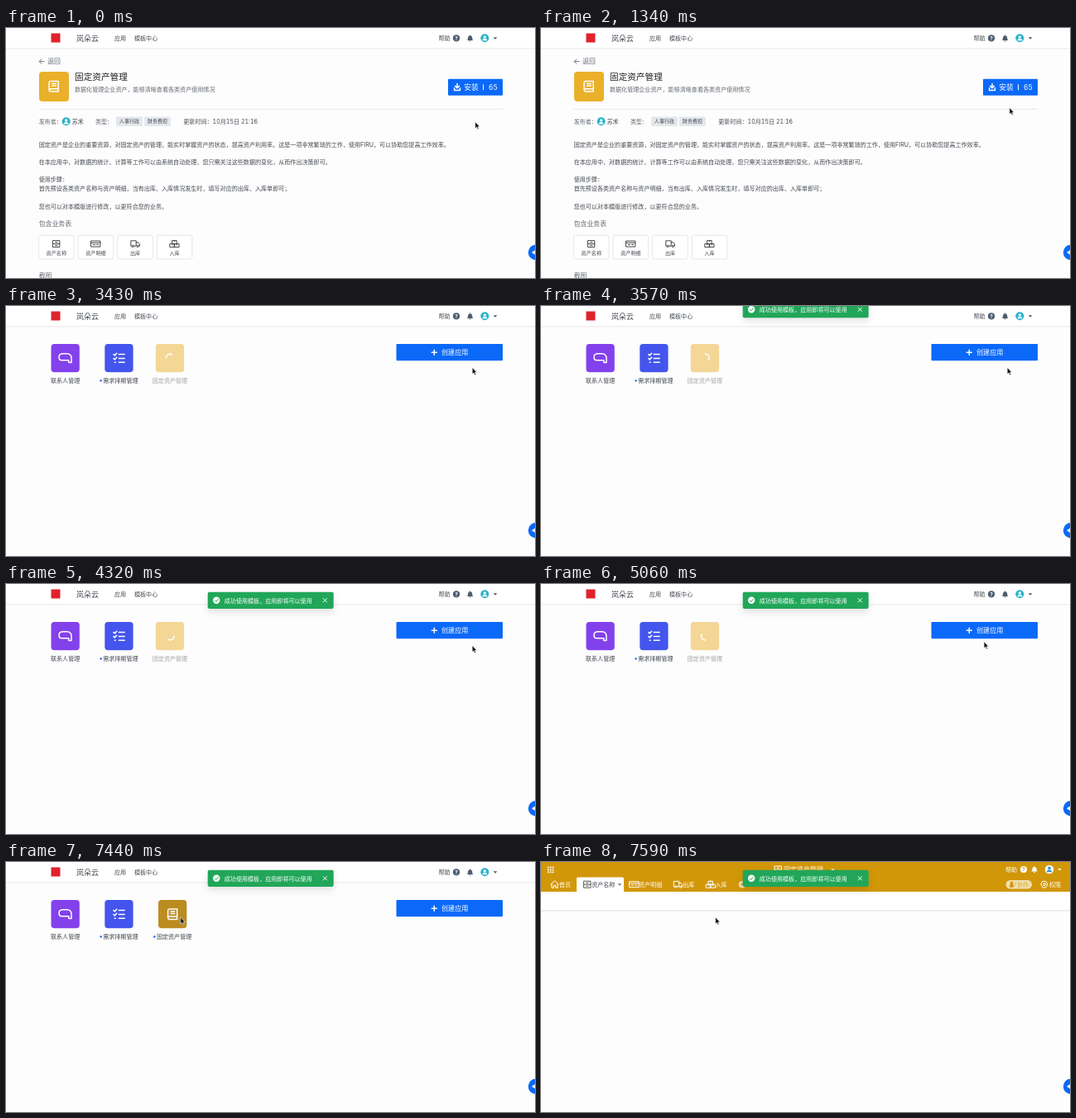
An HTML page for the animation above (8 s loop, 639 by 303 pixels).

```html
<!DOCTYPE html>
<html lang="zh-CN">
<head>
<meta charset="utf-8">
<title>应用安装演示</title>
<style>
html, body { margin: 0; width: 100%; height: 100%; overflow: hidden; background: #fdfdfd; }
svg { display: block; width: 100%; height: 100%; }
text { font: 400 7.07px Inter, "Noto Sans CJK SC", "Noto Sans CJK", sans-serif; font-variant-numeric: tabular-nums; fill: #434850; white-space: pre; }
.small { font-size: 6.1px; }
.mid { font-size: 7.9px; fill: #636a73; }
.soft { fill: #646a72; }
.white { fill: #fff; }
.big { font-size: 8.8px; fill: #fff; }
.mark { font-size: 6.4px; font-weight: 700; text-anchor: middle; }
.line { fill: none; stroke: currentColor; stroke-width: 1; stroke-linecap: round; stroke-linejoin: round; }
.thick { stroke-width: 1.5; }
.rule { stroke: #e2e2e2; stroke-width: .8; }
.card { fill: #fff; stroke: #e0e2e5; stroke-width: .8; }
#toast { filter: drop-shadow(0 4px 4px rgba(0,0,0,.11)); }
</style>
</head>
<body>
<svg viewBox="0 0 639 303">
  <defs>
    <g id="book" class="line thick">
      <path d="M-3.8-6.2H5.5V6.2H-3.8A1.8 1.8 0 0 1-5.6 4.4V-4.4A1.8 1.8 0 0 1-3.8-6.2ZM-5.4 4.2A1.8 1.8 0 0 1-3.8 2.9H5.5M-2.2-3.3H2.6M-2.2-.7H2.6"/>
    </g>
    <g id="cabinet" class="line"><path d="M-4-4H4V4H-4ZM-4 0H4M-1.2-2H1.2M-1.2 2H1.2"/></g>
    <g id="sheet" class="line"><path d="M-5.5-3.5H5.5V3.5H-5.5ZM-5.5-1.3H5.5M-3.3 1H-.8M1.2 1H3.2"/></g>
    <g id="truck" class="line">
      <path d="M-3.9 2.6H-5.2V-3.8H1.2V2.6H-1.4M1.2-1.8H3.6L5.4.4V2.6H4.6"/>
      <circle cx="-2.7" cy="2.9" r="1.2"/><circle cx="3.2" cy="2.9" r="1.2"/>
    </g>
    <g id="boxes" class="line"><path d="M-5.4 0H0V4H-5.4ZM0 0H5.4V4H0ZM-2.6-4H2.6V0H-2.6ZM0-4V-2.6M-2.7 0V1.4M2.7 0V1.4"/></g>
    <g id="bell">
      <path fill="currentColor" d="M-3.6 2.4C-2.5 1.4-2.7.2-2.6-.9A2.6 2.6 0 0 1-.5-3.2V-4H.5V-3.2A2.6 2.6 0 0 1 2.6-.9C2.7.2 2.5 1.4 3.6 2.4ZM-1.1 3H1.1A1.1 1.1 0 0 1-1.1 3Z"/>
    </g>
    <g id="person">
      <circle r="5" fill="currentColor"/>
      <circle cy="-1.3" r="1.7" fill="#fff"/>
      <path d="M-2.9 3.1A2.9 2.5 0 0 1 2.9 3.1Z" fill="#fff"/>
    </g>
    <path id="caret" d="M-2.3-1.1H2.3L0 1.4Z" fill="currentColor"/>
  </defs>

  <rect width="639" height="303" fill="#fdfdfd"/>

  <g id="header">
    <rect width="639" height="24.5" fill="#fff"/>
    <path d="M0 24.9H639" class="rule"/>
    <rect x="54.5" y="6.5" width="11" height="11" fill="#e0222c"/>
    <text x="85" y="15.6" style="font-size:9px">岚朵云</text>
    <text x="131" y="14.8">应用</text>
    <text x="155" y="14.8">模板中心</text>
    <text x="522.5" y="14.8">帮助</text>
    <circle cx="544" cy="12.3" r="4.1" fill="#4d5d70"/>
    <text x="544" y="14.6" class="mark white">?</text>
    <use href="#bell" x="560.6" y="12.5" color="#4d5d70"/>
    <use href="#person" x="578.3" y="12.2" color="#27b3cb"/>
    <use href="#caret" x="591" y="12.3" color="#555"/>
  </g>

  <g id="detail">
    <path d="M46 40.6H40.3M42.8 38L40.2 40.6L42.8 43.2" class="line" color="#717780"/>
    <text x="50.2" y="43.4" class="mid">返回</text>
    <rect x="40" y="53" width="36" height="36" rx="4" fill="#ebb02a"/>
    <use href="#book" x="57.7" y="70.8" color="#fff"/>
    <text x="83" y="62.7" style="font-size:10.65px;fill:#222">固定资产管理</text>
    <text x="83" y="76.7" class="soft">数据化管理企业资产，能够清晰查看各类资产使用情况</text>
    <rect x="534" y="61.7" width="66" height="20" rx="1" fill="#0b69f8"/>
    <path d="M545 67.4V72.4M542.7 70.4L545 72.7L547.3 70.4M541.6 72.8V75.4H548.4V72.8" class="line thick" color="#fff"/>
    <text x="553.3" y="75" class="big">安装</text>
    <path d="M576.5 68.3V75.3" stroke="#fff"/>
    <text x="583" y="75" class="big" style="font-size:8.4px">65</text>
    <path d="M39.5 98.4H600" class="rule"/>
    <text x="39.7" y="115.9" class="soft">发布者：</text>
    <use href="#person" x="72.7" y="113.3" color="#27b3cb"/>
    <text x="79.8" y="115.9">苏禾</text>
    <text x="107.9" y="115.9" class="soft">类型：</text>
    <rect x="133" y="107.6" width="32" height="11.4" rx="1.5" fill="#e4e8ec"/>
    <rect x="167" y="107.6" width="32" height="11.4" rx="1.5" fill="#e4e8ec"/>
    <text x="136.8" y="115.4" class="small">人事行政</text>
    <text x="170.8" y="115.4" class="small">财务费控</text>
    <text x="214.3" y="115.9">更新时间：10月15日 21:16</text>
    <text x="39.7" y="144.2">固定资产是企业的重要资源，对固定资产的管理，能实时掌握资产的状态，提高资产利用率。这是一项非常繁琐的工作，使用FIRU，可以协助您提高工作效率。</text>
    <text x="39.7" y="165.2">在本应用中，对数据的统计、计算等工作可以由系统自动处理，您只需关注这些数据的变化，从而作出决策即可。</text>
    <text x="39.7" y="186.4">使用步骤：</text>
    <text x="39.7" y="197.2">首先预设各类资产名称与资产明细，当有出库、入库情况发生时，填写对应的出库、入库单即可；</text>
    <text x="39.7" y="218.6">您也可以对本模版进行修改，以更符合您的业务。</text>
    <text x="39.7" y="239.5" class="mid">包含业务表</text>
    <g id="cards"></g>
    <text x="39.7" y="303.3" class="mid">截图</text>
  </g>

  <g id="home">
    <rect x="54.5" y="46" width="34.3" height="34.3" rx="4" fill="#8341ec"/>
    <path d="M64 62C64 59.2 66 57.8 69 57.8H73.5C77.3 57.8 79 60.4 79 63.6V68.4H75.8V65.8H67.2C65.2 65.8 64 64.2 64 62Z" class="line thick" color="#fff"/>
    <text x="54" y="93">联系人管理</text>
    <rect x="119.3" y="46" width="34.3" height="34.3" rx="4" fill="#4355ec"/>
    <path d="M130 58.6L131.3 59.9L133.7 57.2M130 63.6L131.3 64.9L133.7 62.2M131.3 68.3H132.2M136.3 58.6H143.2M136.3 63.5H143.2M136.3 68.3H143.2" class="line thick" color="#fff"/>
    <circle cx="114.6" cy="90.5" r="1.2" fill="#1267e8"/>
    <text x="117.2" y="93">需求排期管理</text>
    <g id="loading">
      <rect x="180.8" y="46" width="34.3" height="34.3" rx="4" fill="#f4d696"/>
      <path id="spinner" d="M0-4.9A4.9 4.9 0 0 1 4.2 2.4" class="line thick" color="#fff"/>
      <text x="176.8" y="93" style="fill:#a4a4a4">固定资产管理</text>
    </g>
    <g id="ready">
      <rect id="tile" x="184" y="46" width="34.3" height="34.3" rx="4"/>
      <use href="#book" x="201.2" y="63.2" color="#fff"/>
      <circle cx="179.2" cy="90.5" r="1.2" fill="#1267e8"/>
      <text x="181.9" y="93">固定资产管理</text>
    </g>
    <rect id="create" x="471.5" y="46" width="128.5" height="20.2" rx="1"/>
    <path d="M514.3 56.2H520.3M517.3 53.2V59.2" class="line thick" color="#fff"/>
    <text x="526" y="59.3" class="big" style="font-size:8.1px">创建应用</text>
  </g>

  <g id="app" color="#fff">
    <rect width="639" height="36" fill="#d29708"/>
    <g id="dots" fill="#fff"></g>
    <use href="#cabinet" x="286.5" y="9"/>
    <text x="293" y="12" class="white" style="font-size:8px">固定资产管理</text>
    <use href="#caret" x="352.5" y="9.5"/>
    <text x="561" y="11.8" class="white">帮助</text>
    <circle cx="583" cy="9" r="4.1" fill="#fff"/>
    <text x="583" y="11.3" class="mark" style="fill:#d29708">?</text>
    <use href="#bell" x="596" y="9.2"/>
    <circle cx="614" cy="9" r="5.2" fill="#fff"/>
    <path d="M610.9 12.3A3.1 2.8 0 0 1 617.1 12.3ZM612.2 7.4A1.8 1.8 0 0 1 615.8 7.4A1.8 1.8 0 0 1 612.2 7.4Z" fill="#2499d6"/>
    <use href="#caret" x="626.5" y="9.2"/>
    <path d="M11.5 27.3L16.5 22.8L21.5 27.3M13 26.5V31.3H15.3V28.4H17.7V31.3H20V26.5" class="line"/>
    <text x="22" y="29.8" class="white">首页</text>
    <path d="M43 36V20A1.5 1.5 0 0 1 44.5 18.5H98.5A1.5 1.5 0 0 1 100 20V36Z" fill="#fff"/>
    <use href="#cabinet" x="56" y="27.2" color="#555"/>
    <text x="61.2" y="29.8">资产名称</text>
    <use href="#caret" x="95" y="27.3" color="#777"/>
    <use href="#sheet" x="112.5" y="27.2"/>
    <text x="118" y="29.8" class="white">资产明细</text>
    <use href="#truck" x="165.5" y="27.2"/>
    <text x="171.2" y="29.8" class="white">出库</text>
    <use href="#boxes" x="205" y="27.2"/>
    <text x="210.4" y="29.8" class="white">入库</text>
    <circle cx="243" cy="27.2" r="4.2" fill="#f3e2b6"/>
    <path d="M241 27.2H245M243 25.2V29.2" stroke="#d29708"/>
    <rect x="561.5" y="22" width="31.5" height="10.6" rx="5.3" fill="#f0deb0"/>
    <path d="M566.5 30.4V28.3A2 2 0 0 1 570.5 28.3V30.4ZM567 25.2A1.5 1.5 0 0 1 570 25.2A1.5 1.5 0 0 1 567 25.2ZM571.5 26H574M571.5 28.5H573" fill="#d29708" stroke="#d29708" stroke-width=".6"/>
    <text x="575" y="29.8" style="fill:#dba92f">协作</text>
    <path d="M606.2 23.4H609.8L612 27.2L609.8 31H606.2L604 27.2Z" class="line"/>
    <circle cx="608" cy="27.2" r="1.4" class="line"/>
    <text x="614" y="29.8" class="white">权限</text>
    <rect y="36" width="639" height="22.5" fill="#fff"/>
    <path d="M0 58.9H639" stroke="#d9d9d9" stroke-width=".9"/>
  </g>

  <g id="toast">
    <rect x="243.7" y="9.7" width="152" height="20.2" rx="1.8" fill="#21a659"/>
    <circle cx="254.2" cy="19.8" r="4.2" fill="#fff"/>
    <path d="M252.2 19.9L253.7 21.4L256.3 18.5" class="line" color="#21a659"/>
    <text x="263.8" y="22.5" class="white">成功使用模板，应用即将可以使用</text>
    <path d="M383.2 17.6L387.6 22M387.6 17.6L383.2 22" class="line" color="#fff"/>
  </g>

  <circle cx="640" cy="272" r="9.2" fill="#0b69f8"/>
  <path d="M635 272L639 269.2V274.8Z" fill="#fff"/>

  <path id="arrow" d="M0 0V8L1.8 6.4L3 9.2L4.4 8.6L3.2 5.9H5.6Z" fill="#111" stroke="#fff" stroke-width=".6"/>
  <path id="hand" d="M-.9 5.4V.8A.9.9 0 0 1 .9.8V3.6L4.2 4.2Q5.2 4.5 5.1 5.6L4.4 9.6H.2L-2.3 6.4Q-2.7 5.2-.9 5.6" fill="#fff" stroke="#111" stroke-width=".9" stroke-linejoin="round"/>
</svg>
<script>
const $ = id => document.getElementById(id);
const LOOP = 8000;

$('cards').innerHTML = [['cabinet', '资产名称'], ['sheet', '资产明细'], ['truck', '出库'], ['boxes', '入库']]
  .map(([icon, label], i) => {
    const x = 39.6 + i * 47.6, mid = x + 21.2;
    return `<rect class="card" x="${x}" y="251.3" width="42.4" height="28.6" rx="2"/>
      <use href="#${icon}" x="${mid}" y="261.6" color="#444"/>
      <text class="small" x="${mid}" y="275.2" text-anchor="middle">${label}</text>`;
  }).join('');
$('dots').innerHTML = Array.from({ length: 9 }, (_, i) =>
  `<rect x="${7.8 + i % 3 * 2.9}" y="${5.6 + Math.floor(i / 3) * 2.9}" width="1.8" height="1.8"/>`).join('');

// Pointer moves: first step, last step, number of steps, end point
const START = [566.7, 113.7];
const MOVES = [
  [1190, 1790, 5, [564.5, 65]],
  [2090, 2380, 3, [563.2, 74.6]],
  [4620, 5660, 8, [474.3, 59.6]],
  [6550, 7140, 5, [210.7, 67]]
];
const ease = p => p * p * (3 - 2 * p);

function pointer(t) {
  let from = START;
  for (const [first, last, count, to] of MOVES) {
    if (t < first) return from;
    if (t < last) {
      const gap = (last - first) / (count - 1);
      const p = ease((Math.floor((t - first) / gap) + 1) / count);
      return from.map((v, i) => v + (to[i] - v) * p);
    }
    from = to;
  }
  return from;
}

const inside = ([x, y], l, t, r, b) => x >= l && x <= r && y >= t && y <= b;
const show = (id, on) => $(id).setAttribute('display', on ? 'inline' : 'none');

function draw(t) {
  const pos = pointer(t);
  const detail = t < 3430, app = t >= 7590, home = !detail && !app;
  const ready = t >= 5800;
  const overCreate = home && inside(pos, 471, 46, 600, 66);
  const overTile = home && ready && inside(pos, 184, 46, 218, 80);
  const overInstall = t < 2380 && inside(pos, 534, 62, 600, 82);
  const hand = overInstall || overCreate || (overTile && t < 7440);

  show('header', !app);
  show('detail', detail);
  show('home', home);
  show('app', app);
  show('loading', !ready);
  show('ready', ready);
  show('toast', t >= 3570);
  show('hand', hand);
  show('arrow', !hand);

  $('toast').setAttribute('transform', `translate(0 ${t < 3720 ? -15.6 : 0})`);
  $('create').setAttribute('fill', overCreate ? '#0059d8' : '#0b69f8');
  $('tile').setAttribute('fill', overTile ? '#bb8c20' : '#ebb02a');
  const turn = Math.floor((t - 3420) / 149) * 90 - 90;
  $('spinner').setAttribute('transform', `translate(198.3 63) rotate(${turn})`);
  $(hand ? 'hand' : 'arrow').setAttribute('transform', `translate(${pos})`);
}

const begin = performance.now();
function tick() {
  draw((performance.now() - begin) % LOOP);
  requestAnimationFrame(tick);
}
tick();
</script>
</body>
</html>
```
